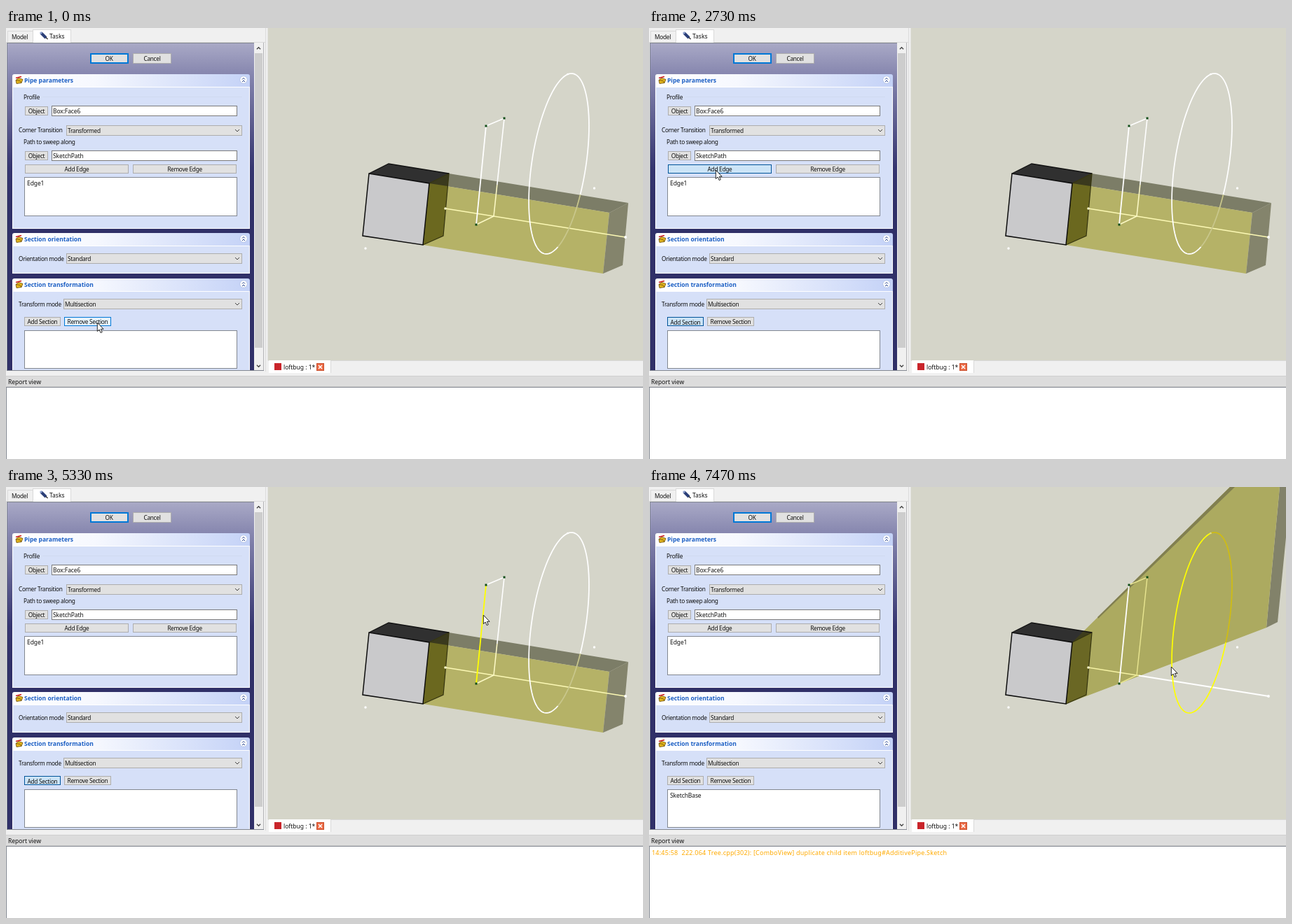
These frames come from a looping animation (909x616 px, 8 s). An HTML page with a canvas:

```html
<!DOCTYPE html>
<html lang="en">
<head>
<meta charset="utf-8">
<title>Pipe parameters</title>
<style>
html, body { margin: 0; width: 100%; height: 100%; overflow: hidden; background: #f0f0f0; }
canvas { display: block; }
</style>
</head>
<body>
<canvas id="view" width="909" height="616"></canvas>
<script>
const ctx = document.getElementById('view').getContext('2d');
const LOOP = 8000, STEP = 200 / 3;
const FONT = '"Noto Sans", "Open Sans", sans-serif';

// Text styles: size, letter spacing, weight
const LABEL = [8.3, -0.3, 400], VALUE = [8.5, -0.1, 400], PLAIN = [8.5, 0, 400];
const TITLE = [8.5, 0, 700], LOG = [9, 0.22, 400];

// Pointer path: time, x, y
const PATH = [
  [0, 130, 421], [67, 121, 414], [133, 96, 401], [200, 60, 393], [267, 19, 398], [333, 30, 409],
  [400, 47, 418], [1533, 47, 418], [1667, 52, 418], [1800, 52, 418], [2067, 75, 273],
  [2200, 130, 215], [2333, 195, 200], [2533, 130, 202], [2667, 95, 203], [3133, 95, 203],
  [3333, 70, 300], [3600, 29, 434], [3733, 5, 459], [3867, 20, 440], [4000, 34, 418],
  [4267, 34, 418], [4333, 36, 424], [4400, 60, 434], [4533, 330, 400], [4733, 765, 301],
  [4867, 748, 262], [5000, 715, 225], [5133, 681, 193], [5333, 681, 183], [6733, 681, 183],
  [7000, 705, 215], [7200, 735, 248], [7333, 744, 256], [7467, 745, 257]
];

function pointerAt(t) {
  const i = PATH.findIndex(p => p[0] > t);
  if (i < 0) return PATH[PATH.length - 1].slice(1);
  const [t0, x0, y0] = PATH[i - 1], [t1, x1, y1] = PATH[i];
  const f = (t - t0) / (t1 - t0);
  return [Math.round(x0 + (x1 - x0) * f), Math.round(y0 + (y1 - y0) * f)];
}

function text(s, x, y, style = LABEL, color = '#111', align = 'left') {
  ctx.font = `${style[2]} ${style[0]}px ${FONT}`;
  ctx.letterSpacing = style[1] + 'px';
  ctx.textAlign = align;
  ctx.fillStyle = color;
  ctx.fillText(s, x, y + 3);
}

function rect(x, y, w, h, fill) {
  ctx.fillStyle = fill;
  ctx.fillRect(x, y, w, h);
}

function box(x, y, w, h, fill, edge, line = 1) {
  rect(x, y, w, h, edge);
  rect(x + line, y + line, w - 2 * line, h - 2 * line, fill);
}

function trace(pts) {
  ctx.beginPath();
  pts.forEach(p => ctx.lineTo(p[0], p[1]));
}

function poly(pts, fill) {
  trace(pts);
  ctx.closePath();
  ctx.fillStyle = fill;
  ctx.fill();
}

function line(pts, color, width = 1.5) {
  trace(pts);
  ctx.strokeStyle = color;
  ctx.lineWidth = width;
  ctx.stroke();
}

function dot(x, y, color, r = 1.7) {
  ctx.beginPath();
  ctx.arc(x, y, r, 0, 7);
  ctx.fillStyle = color;
  ctx.fill();
}

function vGrad(y0, y1, stops) {
  const g = ctx.createLinearGradient(0, y0, 0, y1);
  stops.forEach(([p, c]) => g.addColorStop(p, c));
  return g;
}

const SKIN = {
  normal: ['#e1e1e1', '#adadad'],
  hover: ['#e5f1fb', '#0078d7'],
  down: ['#cce4f7', '#005499'],
  checked: ['#cce4f7', '#005499']
};

function button(label, x, y, w, h, state, mouse) {
  const [mx, my] = mouse || [-1, -1];
  const over = mx >= x && mx < x + w && my >= y && my < y + h;
  const mode = state || (over ? 'hover' : 'normal');
  box(x, y, w, h, ...SKIN[mode]);
  text(label, x + w / 2, y + h / 2 + (mode === 'checked' ? 1 : 0), LABEL, '#111', 'center');
}

function chevron(x, y, dir, size, color, width = 1) {
  line([[x - size, y - dir * size / 2], [x, y + dir * size / 2], [x + size, y - dir * size / 2]], color, width);
}

function combo(value, x, y) {
  box(x, y, 337 - x, 15, '#e1e1e1', '#adadad');
  text(value, x + 2, y + 7.5);
  chevron(330, y + 7.5, 1, 3, '#444');
}

function field(value, x, y, w, h) {
  box(x, y, w, h, '#fff', '#7a7a7a');
  text(value, x + 2, y + 8, VALUE);
}

function group(title, y, bottom) {
  ctx.beginPath();
  ctx.roundRect(9, y, 339, 19, [3, 3, 0, 0]);
  const g = ctx.createLinearGradient(9, 0, 348, 0);
  g.addColorStop(0, '#fff');
  g.addColorStop(0.35, '#f6f8fe');
  g.addColorStop(1, '#c4d2f7');
  ctx.fillStyle = g;
  ctx.fill();
  box(9, y + 18, 339, bottom - y - 18, '#d6e0f8', '#fff');
  const c = y + 8.5;
  poly([[14, c], [18, c - 3], [24, c - 1], [22, c + 4], [15, c + 5]], '#e3b51c');
  line([[14, c], [15, c + 5], [22, c + 4], [24, c - 1], [18, c - 3], [14, c], [20, c + 1], [22, c + 4]], '#6a4b08', 0.8);
  line([[14, c - 3], [18, c - 4], [22, c - 5]], '#d01818', 1.6);
  text(title, 26, c, TITLE, '#1c5fc4');
  dot(339, c - 0.5, '#b3c3e6', 5.6);
  dot(339, c - 0.5, '#fff', 4.8);
  chevron(339, c - 2, -1, 2, '#23408c');
  chevron(339, c + 1.5, -1, 2, '#23408c');
}

function tabs() {
  rect(0, 0, 373, 616, '#f0f0f0');
  rect(0, 20, 371, 1, '#d9d9d9');
  rect(370, 0, 1, 491, '#dcdcdc');
  box(2, 4, 37, 17, '#f0f0f0', '#d9d9d9');
  box(38, 2, 55, 20, '#fff', '#d9d9d9');
  text('Model', 8, 12.5);
  line([[50, 7], [57, 14]], '#2b3f78', 4);
  line([[49, 6], [51, 8]], '#8fa3cf', 3);
  line([[57, 13.5], [59.5, 16]], '#222', 1.3);
  text('Tasks', 62, 12, PLAIN);
}

function tasks(t, mouse) {
  ctx.save();
  ctx.beginPath();
  ctx.rect(0, 21, 370, 469);
  ctx.clip();
  rect(2, 22, 352, 468, vGrad(22, 490, [[0, '#a9a9c6'], [0.1, '#8484ad'], [0.38, '#353570'], [0.5, '#303068'], [1, '#303068']]));
  rect(1, 21, 353, 1, '#828790');
  rect(1, 21, 1, 469, '#828790');

  box(120, 36, 55, 15, '#e1e1e1', '#0078d7', 2);
  text('OK', 147, 43.5, LABEL, '#111', 'center');
  button('Cancel', 181, 36, 55, 15);

  group('Pipe parameters', 66, 287);
  rect(52, 98, 285, 1, '#d0daf0');
  text('Profile', 25, 99);
  button('Object', 27, 112, 33, 13);
  field('Box:Face6', 65, 111, 265, 15);
  text('Corner Transition', 18, 146);
  combo('Transformed', 86, 139);
  text('Path to sweep along', 25, 163);
  button('Object', 27, 176, 33, 13);
  field('SketchPath', 65, 175, 265, 15);

  let edge = '';
  if (t >= 2866 && t < 4133) edge = 'checked';
  else if (t >= 2733 && t < 2866) edge = 'down';
  button('Add Edge', 27, 195, 148, 13, edge, mouse);
  button('Remove Edge', 181, 195, 148, 13, '', mouse);
  box(26, 213, 304, 56, '#fff', '#828790');
  text('Edge1', 30, 222, VALUE);

  group('Section orientation', 293, 351);
  text('Orientation mode', 18, 329.5);
  combo('Standard', 86, 322);

  group('Section transformation', 358, 500);
  text('Transform mode', 18, 394.5);
  combo('Multisection', 82, 387);
  let section = '';
  if (t >= 1400 && t < 2866 || t >= 4133 && t < 6066) section = 'checked';
  else if (t >= 600 && t < 1400) section = 'down';
  button('Add Section', 26, 413, 52, 13, section, mouse);
  button('Remove Section', 83, 413, 67, 13, '', mouse);
  box(26, 432, 304, 55, '#fff', '#828790');
  if (t >= 6066) text('SketchBase', 30, 440.5, VALUE);

  rect(354, 22, 13, 468, '#f0f0f0');
  rect(355, 36, 11, 421, '#cdcdcd');
  chevron(360.5, 29, -1, 2.6, '#444', 1.3);
  chevron(360.5, 483, 1, 2.6, '#444', 1.3);
  rect(367, 21, 1, 469, '#b4b4b8');
  rect(1, 489, 367, 1, '#828790');
  ctx.restore();
}

function circle(from, to, color) {
  const pts = [];
  for (let i = 0; i <= 90; i++) {
    const a = from + (to - from) * i / 90;
    pts.push([789 + 18 * Math.cos(a) + 39 * Math.sin(a), 194 - 129 * Math.cos(a)]);
  }
  line(pts, color, 1.7);
}

function scene(t) {
  const lofted = t >= 6066;
  ctx.save();
  ctx.beginPath();
  ctx.rect(374, 0, 535, 475);
  ctx.clip();
  rect(374, 0, 535, 475, '#d5d5c9');

  const A = [518, 208], B = [604, 222], C = [595, 310], D = [509, 297];
  const E = [546, 194], F = [632, 208], G = [624, 297];
  if (lofted) {
    poly([[881, 201], [897, 193], [909, 72], [909, 0], [900, 0]], '#82826a');
    poly([B, [829, 0], [900, 0], [881, 201], C], '#acaa60');
    poly([[640, 186], [829, 0], [836, 0], [641, 188]], '#817f50');
  } else {
    poly([B, F, [888, 250], [861, 264]], '#7c7d67');
    poly([B, [861, 264], [852, 351], C], '#b5b267');
    poly([[861, 264], [888, 250], [880, 339], [852, 351]], '#84846c');
  }

  poly([A, B, C, D], '#c9c9cb');
  poly([A, E, F, B], '#303030');
  poly([B, F, G, C], lofted ? '#6a6724' : '#6b681f');
  if (lofted) poly([B, [618, 208], [619, 206], F], '#3d3c1c');
  else poly([B, F, [630, 226]], '#3a391d');
  line([B, F, G, C], '#35340f', 1.2);
  line([A, E, F], '#111', 1.3);
  line([D, A, B, C, D, A], '#0c0c0c', 1.5);

  const P = [627, 258], Q = [884, 299];
  if (t >= 2866 && t < 4133) {
    line([P, Q], '#f542b0', 1.8);
    line([[857, 294.7], Q], '#d42cd2', 1.8);
  } else if (lofted) {
    line([P, [699, 269.5]], '#f5f2a4', 1.6);
    line([[699, 269.5], Q], '#fff', 2);
  } else {
    line([P, Q], '#fbf8b4', 1.7);
  }

  const K = [685, 140], L = [711, 129], M = [696, 269], N = [671, 281];
  if (lofted) {
    line([K, L, M, N], '#e9e691', 1.4);
  } else {
    line([K, L, [700.8, 224]], '#fff', 1.6);
    line([[700.8, 224], M, N], '#fbf8c4', 1.6);
  }
  line([K, N], t >= 5133 && !lofted ? '#ff0' : '#fff', 1.8);

  const lit = t >= 4866 && t < 4999 || t >= 7266;
  const [h0, h1] = lofted ? [-0.12, 1.79] : [1.92, 2.74];
  circle(h1, h0 + 2 * Math.PI, lit ? '#ff0' : '#fff');
  circle(h0, h1, lofted ? (lit ? '#d0bd12' : '#cdca80') : (lit ? '#cfc53a' : '#c9c78c'));

  [K, L, N].forEach(p => {
    rect(p[0] - 1.5, p[1] - 1.5, 3, 3, '#0c4a14');
  });
  dot(...P, '#fdfbc8', 1.8);
  dot(...Q, '#fff', 1.9);
  dot(513, 315, '#fff');
  dot(839.5, 229, '#fff');
  dot(801.5, 66, lofted ? '#dcd98a' : '#fff', 1.3);
  ctx.restore();
}

function bottom(t) {
  rect(373, 475, 536, 23, '#f0f0f0');
  rect(373, 0, 1, 475, '#e3e3e0');
  rect(374, 475, 535, 1, '#d9d9d9');
  rect(375, 475, 88, 18, '#fff');
  rect(463, 475, 1, 18, '#d9d9d9');
  rect(383, 479, 10, 10, '#c9252b');
  text('loftbug : 1*', 396, 484.5, PLAIN);
  box(443, 479, 11, 11, '#ec6a45', '#c9502e');
  line([[446, 482], [451, 487]], '#fff', 1.5);
  line([[451, 482], [446, 487]], '#fff', 1.5);

  rect(0, 491, 373, 7, '#f0f0f0');
  box(-1, 497, 911, 16, '#dcdcdc', '#cfcfcf');
  text('Report view', 3, 505.5, PLAIN);
  box(0, 513, 910, 104, '#fff', '#828790');
  if (t >= 6199) {
    text('14:45:58\u00a0 222.064 Tree.cpp(302): [ComboView] duplicate child item loftbug#AdditivePipe.Sketch',
      4, 523, LOG, '#ffaa00');
  }
}

function pointer([x, y]) {
  const shape = [[0, 0], [0, 12.6], [2.8, 10], [4.8, 14.6], [6.9, 13.7], [5, 9.3], [8.8, 9.3]]
    .map(p => [p[0] + x + 0.3, p[1] + y]);
  poly(shape, '#fff');
  line([...shape, shape[0]], '#111', 0.9);
}

function draw(ms) {
  // The screen advances in fixed steps of 1/15 s
  const t = Math.floor((ms + 4) / STEP) * STEP + 0.4;
  const mouse = pointerAt(t);
  tabs();
  tasks(t, mouse);
  scene(t);
  bottom(t);
  pointer(mouse);
}

let start;
function tick(now) {
  if (start === undefined) start = now;
  draw((now - start) % LOOP);
  requestAnimationFrame(tick);
}
draw(0);
requestAnimationFrame(tick);
</script>
</body>
</html>
```
